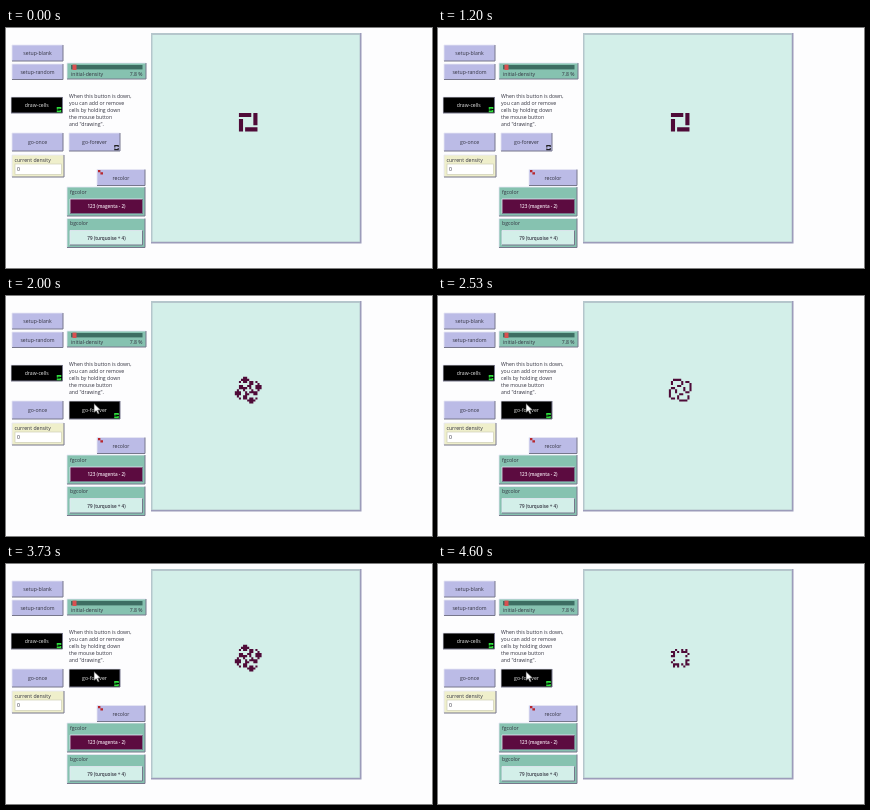
An HTML page that plays this animation: 426 by 240 pixels, repeating every 4670 ms.

```html
<!DOCTYPE html>
<html lang="en">
<head>
<meta charset="utf-8">
<title>Life model</title>
<style>
  html, body { margin: 0; width: 100%; height: 100%; overflow: hidden; background: #fdfdfe; }
  svg { display: block; width: 100%; height: 100%; }
  text { font: 5.15px "Open Sans", sans-serif; fill: #333340; }
  .mid { text-anchor: middle; }
  .end { text-anchor: end; }
  .small { font-size: 4.6px; font-weight: 600; }
  .on rect { fill: #000; }
  .on text { fill: #e4e4e4; }
  .on .loop { stroke: #2fe03c; fill: #1c8a2a; }
  .loop { fill: none; stroke: #222; stroke-width: 1.1; }
</style>
</head>
<body>
<svg id="stage" viewBox="0 0 426 240">
  <g id="panel"></g>

  <g id="note"></g>

  <!-- world view -->
  <rect x="145" y="5" width="210.5" height="210.5" fill="#9c9cba"/>
  <rect x="145" y="5" width="209" height="209" fill="#b5c6cc"/>
  <rect x="146.5" y="7" width="207" height="206.5" fill="#d3efe9"/>
  <path id="cells" fill="#4f0b38"/>

  <path id="cursor" d="M0 0V9.2L2.2 7.2L3.8 10.6L5.3 9.9L3.8 6.6H6.7Z"
        fill="#fff" stroke="#222" stroke-width=".6"/>
</svg>
<script>
const LOOP = 4670, FRAMES = 70;
const START = 27.5, RATE = 12 / 13;   // frame of the press, generations per frame
const CELL = 2.06, CX = 242.2, CY = 94.2;
const N = 17, MID = 8;

const $ = id => document.getElementById(id);
const panel = $('panel');

function add(parent, tag, attrs, content) {
  const el = document.createElementNS('http://www.w3.org/2000/svg', tag);
  for (const k in attrs) el.setAttribute(k, attrs[k]);
  if (content) el.textContent = content;
  parent.appendChild(el);
  return el;
}

const label = (parent, x, y, s, cls = '') => add(parent, 'text', { x, y, class: cls }, s);

function box(parent, x, y, width, height, fill) {
  add(parent, 'rect', { x, y, width, height, fill });
  add(parent, 'path', { d: `M${x} ${y + height}V${y}H${x + width}`, fill: 'none', stroke: '#e6e6f4', 'stroke-width': .8 });
  add(parent, 'path', { d: `M${x} ${y + height}H${x + width}V${y}`, fill: 'none', stroke: '#77778c', 'stroke-width': 1 });
}

function button(x, y, w, h, name, forever) {
  const g = add(panel, 'g', {});
  box(g, x, y, w, h, '#bbbbe6');
  label(g, x + w / 2, y + h / 2 + 2, name, 'mid');
  if (forever) {
    const r = x + w - 5.2, b = y + h - 5.4;
    add(g, 'path', { class: 'loop', d: `M${r} ${b + 2}V${b}H${r + 3.4}V${b + 1.4}M${r + 3.4} ${b + 2.4}V${b + 4}H${r}V${b + 2.8}` });
  }
  return g;
}

function colorInput(y, name, value, fill, ink) {
  box(panel, 61, y, 78, 29, '#86c2b0');
  label(panel, 64, y + 6.8, name);
  box(panel, 64, y + 12, 72.5, 14.5, fill);
  label(panel, 100.5, y + 21, value, 'mid small').style.fill = ink;
}

button(6, 17, 51, 16, 'setup-blank');
button(6, 36, 51, 15.5, 'setup-random');
const draw = button(5, 69, 51.5, 16, 'draw-cells', true);
button(6, 105, 51, 18, 'go-once');
const go = button(63, 105, 51, 18, 'go-forever', true);
button(91, 141.5, 48, 16, 'recolor');
add(panel, 'path', { d: 'M92 142h2.4v2.2H97v2.2h-2.6v-2.2H92z', fill: '#b8262c' });
draw.classList.add('on');

box(panel, 61, 35, 79, 16, '#86c2b0');
add(panel, 'rect', { x: 65, y: 37, width: 71.5, height: 4.4, fill: '#3d6d62' });
add(panel, 'rect', { x: 66.5, y: 36.6, width: 4, height: 5.4, fill: '#d95050' });
label(panel, 65, 48, 'initial-density');
label(panel, 136.5, 48, '7.8 %', 'end');

box(panel, 6, 127, 52, 22, '#efefcb');
label(panel, 8.5, 133.5, 'current density');
add(panel, 'rect', { x: 9, y: 136, width: 46.5, height: 10.5, fill: '#fff', stroke: '#cfcfb6', 'stroke-width': .7 });
label(panel, 11, 143.2, '0');

colorInput(159, 'fgcolor', '123 (magenta - 2)', '#5c0b40', '#f2e4ee');
colorInput(190.5, 'bgcolor', '79 (turquoise + 4)', '#d3efe9', '#333340');

['When this button is down,', 'you can add or remove', 'cells by holding down', 'the mouse button', 'and "drawing".']
  .forEach((s, i) => label($('note'), 63, 69.6 + i * 7, s));

// Four 6x2 bars in a pinwheel: a period 8 oscillator of Life.
function seed() {
  const g = new Set();
  for (let a = -4; a <= 1; a++)
    for (const b of [-4, -3])
      for (let r = 0, x = a, y = b; r < 4; r++, [x, y] = [-y, x]) g.add((y + MID) * N + x + MID);
  return g;
}

function step(g) {
  const count = new Map(), next = new Set();
  for (const c of g)
    for (const dy of [-N, 0, N])
      for (const dx of [-1, 0, 1])
        if (dx || dy) count.set(c + dx + dy, (count.get(c + dx + dy) || 0) + 1);
  for (const [c, n] of count) if (n === 3 || (n === 2 && g.has(c))) next.add(c);
  return next;
}

function outline(g) {
  let d = '';
  for (const c of g) {
    const x = CX + (c % N - MID - .5) * CELL, y = CY + (Math.floor(c / N) - MID - .5) * CELL;
    d += `M${x.toFixed(2)} ${y.toFixed(2)}h${CELL}v${CELL}h${-CELL}z`;
  }
  return d;
}

const phases = [];
for (let i = 0, g = seed(); i < 8; i++, g = step(g)) phases.push(outline(g));

function render(now) {
  // frame times are rounded to 10 ms, so a frame may begin slightly early
  const f = Math.floor(now % LOOP / LOOP * FRAMES + .12);
  const gen = Math.max(0, Math.floor((f - START) * RATE));
  $('cells').setAttribute('d', phases[gen % 8]);
  go.classList.toggle('on', f > START);

  // the arrow leaves the view and settles on the button
  const p = Math.min(1, Math.max(0, (f - 20) / 6)), e = p * p * (3 - 2 * p);
  $('cursor').setAttribute('transform', `translate(${142 - 54 * e} ${104 + 3.5 * e})`);
  $('cursor').setAttribute('visibility', f > 20 && f < FRAMES ? 'visible' : 'hidden');
  requestAnimationFrame(render);
}
render(performance.now());
</script>
</body>
</html>
```
